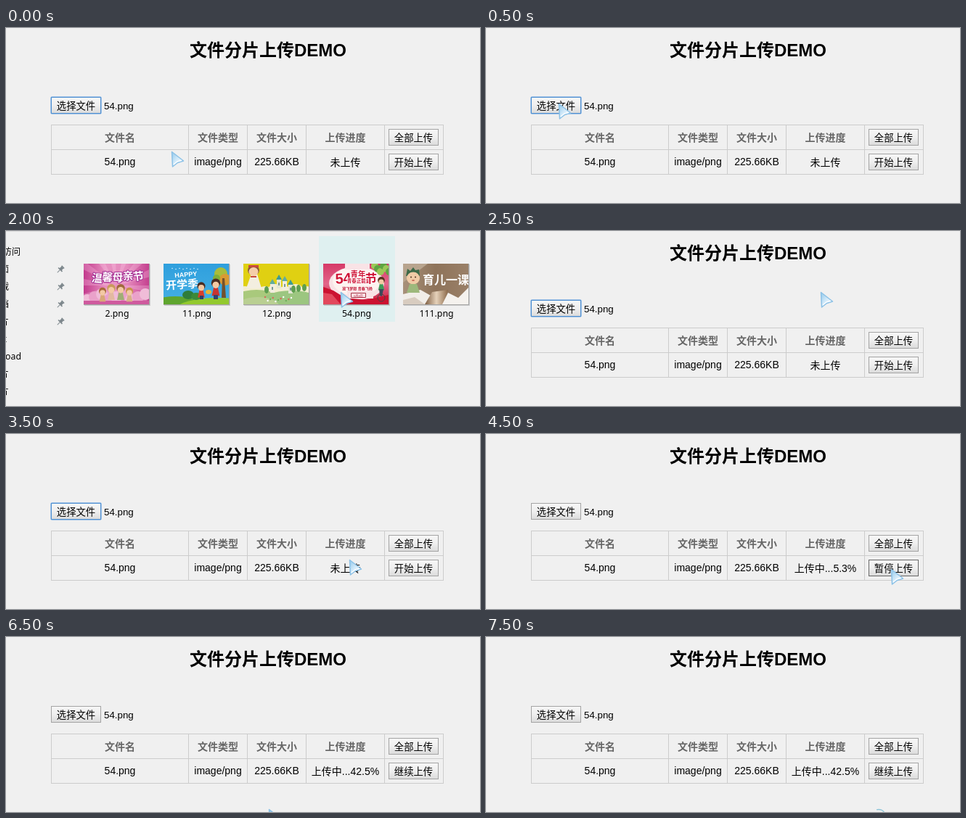
Recreate the animation shown at these times as an HTML page with a canvas. Size 653 px wide and 241 px high, loop 8000 ms.

```html
<!DOCTYPE html>
<html lang="zh-CN">
<head>
<meta charset="utf-8">
<title>文件分片上传</title>
<style>
html, body { margin: 0; width: 100%; height: 100%; overflow: hidden; background: #f0f0f0; }
canvas { display: block; width: 653px; height: 241px; }
</style>
</head>
<body>
<canvas id="stage" width="653" height="241"></canvas>
<script>
const ctx = document.getElementById('stage').getContext('2d');
const STEP = 500, LOOP = 8000;
const UI = '"Liberation Sans", "Noto Sans CJK SC", "Noto Sans CJK", sans-serif';
const SHELL = '"Noto Sans", "Noto Sans CJK SC", "Noto Sans CJK", sans-serif';

function text(str, x, y, font, color = '#000', align = 'left') {
  ctx.font = font;
  ctx.fillStyle = color;
  ctx.textAlign = align;
  ctx.fillText(str, x, y);
}

function rect(x, y, w, h, color) {
  ctx.fillStyle = color;
  ctx.fillRect(x, y, w, h);
}

function dot(x, y, r, color, ry = r) {
  ctx.fillStyle = color;
  ctx.beginPath();
  ctx.ellipse(x, y, r, ry, 0, 0, Math.PI * 2);
  ctx.fill();
}

function poly(points, color) {
  ctx.fillStyle = color;
  ctx.beginPath();
  for (let i = 0; i < points.length; i += 2) ctx.lineTo(points[i], points[i + 1]);
  ctx.closePath();
  ctx.fill();
}

function gradient(x0, y0, x1, y1, ...colors) {
  const g = ctx.createLinearGradient(x0, y0, x1, y1);
  colors.forEach((c, i) => g.addColorStop(i / (colors.length - 1), c));
  return g;
}

function at(x, y, angle, draw) {
  ctx.save();
  ctx.translate(x, y);
  ctx.rotate(angle);
  draw();
  ctx.restore();
}

function label(str, x, y, size, fill, edge, width = 2) {
  ctx.font = `bold ${size}px ${UI}`;
  ctx.textAlign = 'center';
  ctx.lineJoin = 'round';
  ctx.lineWidth = width;
  ctx.strokeStyle = edge;
  ctx.strokeText(str, x, y);
  ctx.fillStyle = fill;
  ctx.fillText(str, x, y);
}

function child(x, y, hair, shirt, s = 1) {
  poly([x - 4 * s, y + 12 * s, x - 2 * s, y + 3 * s, x + 2 * s, y + 3 * s, x + 4 * s, y + 12 * s], shirt);
  dot(x, y - s, 4.6 * s, hair);
  dot(x, y + s, 3.4 * s, '#f3c9a4');
}

// Folder pictures, each 90 by 56
function motherDay() {
  rect(0, 0, 90, 56, gradient(0, 0, 90, 0, '#c23a8c', '#e78fc0', '#e58abd', '#c4408f'));
  for (let i = 0; i < 14; i++) {
    const a = i * Math.PI / 7;
    poly([45, 30, 45 + 70 * Math.cos(a), 30 + 70 * Math.sin(a),
      45 + 70 * Math.cos(a + .2), 30 + 70 * Math.sin(a + .2)], 'rgba(255,215,238,.25)');
  }
  for (let i = 0; i < 9; i++) dot(5 + i * 10, 50 - (i % 3) * 4, 8, i % 2 ? '#eaa2ca' : '#f0bcd8');
  rect(0, 51, 90, 5, '#cf5a9e');
  [...'温馨母亲节'].forEach((c, i) => {
    const d = i - 2;
    at(47 + d * 14.5, 24 - d * .8 - (i % 2), d * -.05, () => label(c, 0, 0, 15, '#fff', '#a83596', 2.2));
  });
  child(26, 39, '#a96a3c', '#d8a878', 1.1);
  child(38, 35, '#c99a5c', '#e3b9a0', 1.25);
  child(51, 35, '#a06a3c', '#9fae74', 1.25);
  child(63, 39, '#c9924c', '#d8b088', 1.1);
}

function schoolSeason() {
  rect(0, 0, 90, 56, gradient(0, 0, 0, 56, '#2f9fdd', '#45b0e4'));
  dot(16, 62, 40, '#5fa52e', 17);
  dot(74, 62, 56, '#93c92e', 15);
  dot(34, 43, 8, '#2f7d3a', 6);
  dot(45, 45, 7, '#3c8a38', 5);
  dot(79, 14, 9, '#a8bc3c');
  dot(85, 22, 8, '#d99a34');
  dot(73, 20, 5, '#7fae3a');
  poly([81, 20, 84, 20, 86, 47, 80, 47], '#74512c');
  for (let i = 0; i < 8; i++) dot(12 + i * 5, 6.5 + (i % 2), .8, '#d4eefa');
  at(31, 18, -.08, () => text('HAPPY', 0, 0, `bold 9px ${UI}`, '#fff', 'center'));
  at(26, 34, -.07, () => text('开学季', 0, 0, `bold 15px ${UI}`, '#fff', 'center'));
  child(52, 32, '#4a2c22', '#d8402c', 1.2);
  child(72, 28, '#4b2d22', '#c93430', 1.35);
  dot(62, 39, 4, '#e8b838', 3);
  rect(50, 44, 5, 5, '#2f3f68');
  rect(69, 43, 6, 6, '#35406a');
}

function village() {
  rect(0, 0, 90, 56, '#e0d012');
  for (let i = 0; i < 7; i++) dot(2 + i * 14, 37 - (i % 2) * 3, 9, '#f3eed0', 6);
  dot(18, 58, 42, '#a9c97c', 22);
  dot(66, 58, 46, '#9cc680', 21);
  dot(20, 60, 30, '#b9cf92', 14);
  [[37, 28], [46, 22], [54, 24], [62, 29]].forEach(([x, y], i) => {
    rect(x, y, 6, 12, i % 2 ? '#e4e6d4' : '#f0ede0');
    poly([x - 1, y, x + 3, y - 7, x + 7, y], i % 2 ? '#3f9a94' : '#62aca0');
    rect(x + 2, y + 4, 2, 4, '#7c9a96');
  });
  [32, 69, 76, 84].forEach((x, i) => dot(x, 36 - i, 3, '#5e9e50', 5));
  for (let i = 0; i < 11; i++)
    dot(30 + i * 3.6, 46 + (i * 5) % 7, 1.2, ['#d86858', '#fff', '#6fae5c'][i % 3]);
  poly([11, 14, 19, 14, 25, 34, 4, 34], '#f3eee0');
  dot(14, 9, 8, '#8a5a38', 7);
  dot(14, 11, 6.5, '#f5cda8', 6);
  rect(7, 2, 14, 3, '#c84a3c');
  rect(10, 17, 8, 2, '#c84a3c');
}

function youthDay() {
  rect(0, 0, 90, 56, gradient(0, 0, 0, 56, '#d63a68', '#e2668a', '#c81734'));
  dot(46, 27, 38, '#f9e3e6', 23);
  dot(46, 24, 33, '#fdf3f0', 20);
  rect(30, 0, 34, 8, '#f9e3e6');
  for (let i = 0; i < 6; i++) dot(71 + i * 4, 3 + (i % 3) * 4, 5, i % 2 ? '#5ea542' : '#9cc858');
  poly([0, 32, 14, 37, 30, 47, 60, 50, 90, 43, 90, 56, 0, 56], '#cc1230');
  poly([0, 40, 12, 42, 24, 56, 0, 56], '#e2485c');
  rect(33, 37, 36, 11, '#f9e3e6');
  at(28, 27, -.06, () => label('54', 0, 0, 20, '#cf1436', '#fff', 2));
  label('青年', 48, 18, 10.5, '#cf1436', '#fff', 1.5);
  label('青春正能量', 49, 26, 6.5, '#cf1436', '#fff', 1);
  label('节', 66, 26, 16, '#cf1436', '#fff', 2);
  text('放飞梦想 青春飞扬', 47, 35.5, `bold 5px ${UI}`, '#c01838', 'center');
  ctx.strokeStyle = '#a83848';
  ctx.lineWidth = 1;
  ctx.strokeRect(38.5, 40.5, 20, 6);
  text('5月4日', 48.5, 45.5, `4px ${UI}`, '#b42040', 'center');
  child(80, 24, '#573320', '#3c9b58', 1.05);
  poly([77, 35, 83, 35, 81, 45, 78, 44], '#3a4a5c');
  ctx.strokeStyle = '#4b4345';
  ctx.beginPath();
  ctx.arc(80, 47, 5, 0, Math.PI * 2);
  ctx.stroke();
}

function lesson() {
  rect(0, 0, 90, 56, gradient(0, 0, 90, 0, '#a8917a', '#8e735a', '#9a8068'));
  poly([0, 0, 34, 0, 0, 26], '#b8a48e');
  poly([0, 42, 24, 36, 40, 45, 32, 56, 0, 56], '#f1ede8');
  poly([30, 56, 40, 39, 62, 36, 56, 56], gradient(30, 0, 62, 0, '#7c5c40', '#e6d2ba', '#8a6848'));
  poly([54, 56, 62, 40, 76, 47, 90, 33, 90, 56], '#f5f2ee');
  poly([0, 50, 16, 46, 30, 56, 0, 56], '#d8ccc0');
  text('育儿一课', 59, 27.5, `bold 16px ${UI}`, '#fff', 'center');
  poly([4, 17, 6, 7, 10, 10, 14, 5, 17, 9, 22, 8, 23, 17], '#3d6a48');
  dot(14, 20, 9, '#f0cba6', 8.5);
  dot(11, 18.5, 1, '#4d3020');
  dot(17, 18.5, 1, '#4d3020');
  dot(14, 23, 2, '#c86b5a', 1);
  poly([9, 28, 19, 28, 23, 40, 5, 40], '#9db87c');
}

const files = [
  ['2.png', motherDay], ['11.png', schoolSeason], ['12.png', village],
  ['54.png', youthDay], ['111.png', lesson]
];

const sidebar = [
  ['快速访问', 20], ['桌面', 4], ['下载', 4], ['文档', 4], ['图片', 4],
  ['root', 1], ['upload', 21], ['图片', 4], ['图片', 4]
];

function pin(x, y) {
  at(x, y, Math.PI / 4, () => {
    rect(-2.5, -5.5, 5, 1.5, '#7d878c');
    rect(-2, -4, 4, 4, '#7d878c');
    rect(-3.8, -.5, 7.6, 1.6, '#7d878c');
    rect(-.5, 1, 1, 5, '#7d878c');
  });
}

function drawFolder(hover) {
  rect(0, 0, 653, 1, '#dcdcdc');
  sidebar.forEach(([name, right], i) => {
    text(name, right, 33 + i * 24, `12.3px ${SHELL}`, '#000', 'right');
    if (i > 0 && i < 5) pin(75, 29 + i * 24);
  });
  files.forEach(([name, art], i) => {
    const x = 107 + i * 110;
    if (i === hover) rect(x - 6, 7, 105, 118, '#dff0f0');
    rect(x + 1, 46, 91, 57, '#cdcdcd');
    rect(x, 45, 91, 57, '#a4a4a4');
    ctx.save();
    ctx.translate(x, 45);
    ctx.beginPath();
    ctx.rect(0, 0, 90, 56);
    ctx.clip();
    art();
    ctx.restore();
    text(name, x + 46, 118, `12.3px ${SHELL}`, '#000', 'center');
  });
}

function button(x, y, caption, state) {
  const w = 69, h = 23;
  rect(x, y, w, h, gradient(0, y, 0, y + h, '#f7f7f7', '#efefef', '#dadada'));
  ctx.lineWidth = 1;
  ctx.strokeStyle = { focus: '#4f8fd0', hover: '#686868' }[state] || '#a4a4a4';
  ctx.strokeRect(x + .5, y + .5, w - 1, h - 1);
  if (state === 'focus') {
    ctx.strokeStyle = 'rgba(90,155,225,.5)';
    ctx.beginPath();
    ctx.roundRect(x - .5, y - .5, w + 1, h + 1, 2);
    ctx.stroke();
  }
  text(caption, x + w / 2, y + 17, `13.33px ${UI}`, '#000', 'center');
}

const columns = [62, 251, 332, 413, 521, 602];
const center = i => (columns[i] + columns[i + 1] + 1) / 2;

function drawPage({ progress = '未上传', action = '开始上传', hover = false, focus = false }) {
  text('文件分片上传DEMO', 361, 39, `bold 24px ${UI}`, '#000', 'center');
  button(62, 95, '选择文件', focus ? 'focus' : '');
  text('54.png', 135, 112, `13.33px ${UI}`);
  columns.forEach(x => rect(x, 133, 1, 69, '#ccc'));
  [133, 167, 201].forEach(y => rect(62, y, 541, 1, '#ccc'));
  ['文件名', '文件类型', '文件大小', '上传进度'].forEach((s, i) =>
    text(s, center(i), 156, `bold 14px ${UI}`, '#666', 'center'));
  ['54.png', 'image/png', '225.66KB', progress].forEach((s, i) =>
    text(s, center(i), i === 3 ? 190 : 189, `14px ${UI}`, '#000', 'center'));
  button(527, 139, '全部上传');
  button(527, 173, action, hover ? 'hover' : '');
}

function arrow(x, y) {
  at(x, y, 0, () => {
    ctx.lineJoin = 'round';
    poly([.5, .5, 16.5, 13, 8.5, 15.5, 1.5, 21], gradient(1, 6, 14, 16, '#a5d3f0', '#d3eaf9', '#f6fbff'));
    ctx.strokeStyle = '#8cc1e6';
    ctx.lineWidth = 1.5;
    ctx.stroke();
    ctx.strokeStyle = 'rgba(255,255,255,.9)';
    ctx.lineWidth = 1.2;
    ctx.beginPath();
    ctx.moveTo(2.8, 18);
    ctx.lineTo(8, 13.8);
    ctx.lineTo(14, 12.3);
    ctx.stroke();
  });
}

function ring(x, y) {
  ctx.strokeStyle = '#8cc4d8';
  ctx.lineWidth = 1.3;
  ctx.beginPath();
  ctx.arc(x, y, 9.5, -Math.PI * .6, -Math.PI * .15);
  ctx.stroke();
}

const chosen = { focus: true };
const paused = { progress: '上传中...42.5%', action: '继续上传' };
const sending = (pct, hover) => ({ progress: `上传中...${pct}%`, action: '暂停上传', hover });

// One entry per half second: page or hovered file, then pointer place
const scenes = [
  [chosen, 228, 170], [chosen, 100, 104],
  [0, 113, 110], [2, 421, 96], [3, 461, 84],
  [chosen, 461, 84], [chosen, 456, 150], [chosen, 473, 173],
  [{ focus: true, hover: true }, 558, 186],
  [sending('5.3', true), 558, 186],
  [sending('15.9', false), 549, 214],
  [sending('31.5', false), 551, 197],
  [paused, 537, 208], [paused, 362, 237], [paused, 362, 237],
  [paused, 541, 247, ring]
];

function frame(now) {
  const [view, x, y, pointer = arrow] = scenes[Math.floor((now % LOOP) / STEP)];
  rect(0, 0, 653, 241, '#f0f0f0');
  if (typeof view === 'number') drawFolder(view);
  else drawPage(view);
  pointer(x, y);
}

const start = performance.now();
function tick() {
  frame(performance.now() - start);
  requestAnimationFrame(tick);
}
tick();
</script>
</body>
</html>
```
